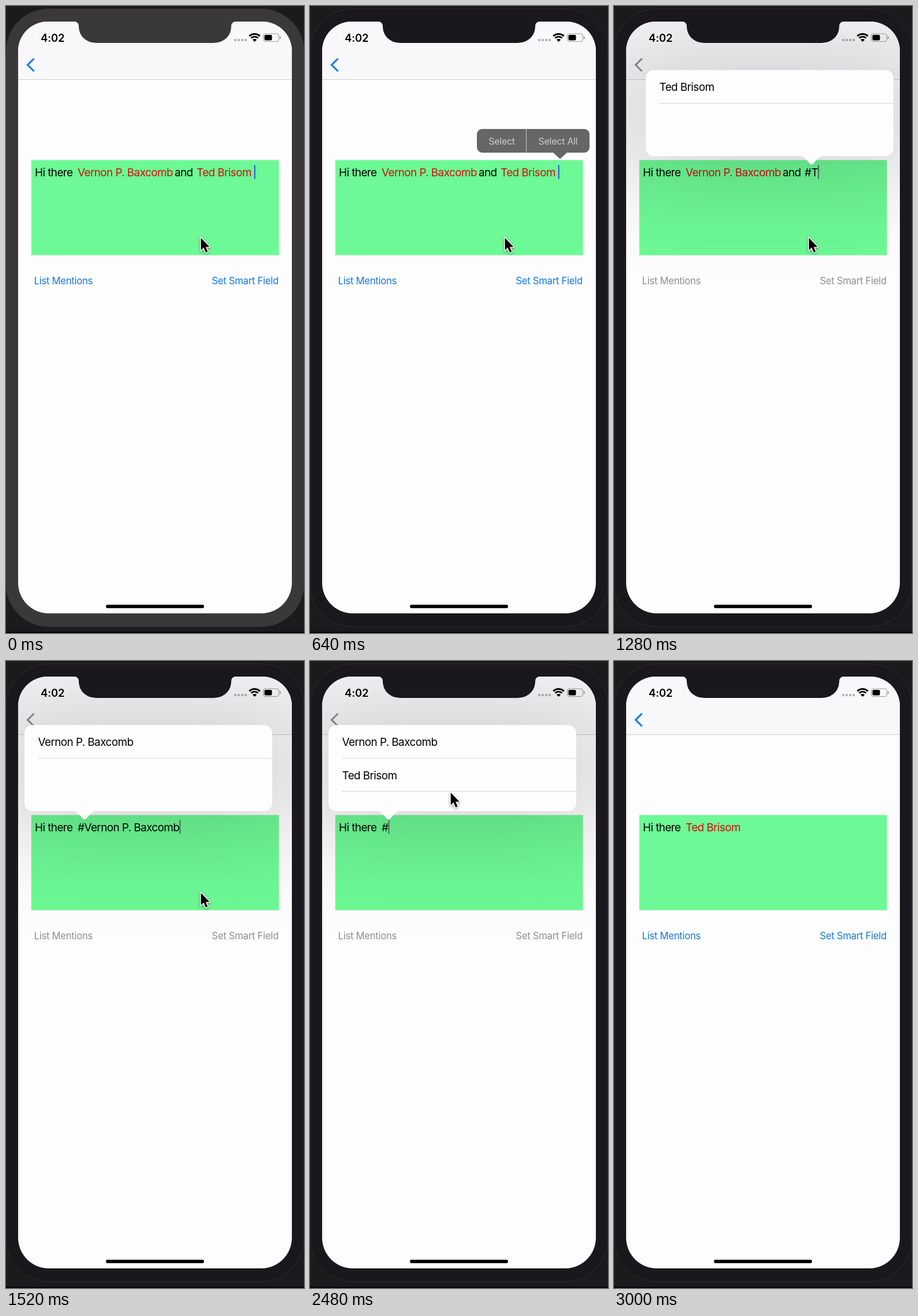
Write an HTML page with a canvas that moves like this. It is 516 px wide and 1086 px high and loops after 3040 ms.

```html
<!DOCTYPE html>
<html lang="en">
<head>
<meta charset="utf-8">
<title>Mention field</title>
<style>
html, body { margin: 0; width: 100%; height: 100%; overflow: hidden; background: #1a191b; }
canvas { display: block; }
</style>
</head>
<body>
<canvas id="stage" width="516" height="1086"></canvas>
<script>
const ctx = document.getElementById('stage').getContext('2d');
const LOOP = 3040;
const FIRST = 'Vernon P. Baxcomb';
const SECOND = 'Ted Brisom';
const RED = '#d60d0d';

// Deleting starts at ERASE and removes one character per KEY milliseconds.
const ERASE = 960, KEY = 33.4, PICK = 2680;
const LINK_END = SECOND.length + 1;
const REOPEN = LINK_END + 5;
const LAST_KEY = REOPEN + FIRST.length;
const keyTime = n => ERASE + n * KEY;

const clamp = v => Math.max(0, Math.min(1, v));
const ramp = (t, a, b) => clamp((t - a) / (b - a));
const smooth = v => v * v * (3 - 2 * v);
const lerp = (a, b, p) => a + (b - a) * p;
const mix = (a, b, p) => `rgb(${a.map((v, i) => Math.round(lerp(v, b[i], p)))})`;

function box(x, y, w, h, r, fill) {
  ctx.beginPath();
  ctx.roundRect(x, y, w, h, r);
  if (fill) { ctx.fillStyle = fill; ctx.fill(); }
}

function polygon(points, fill) {
  ctx.beginPath();
  points.forEach(([x, y]) => ctx.lineTo(x, y));
  ctx.closePath();
  if (fill) { ctx.fillStyle = fill; ctx.fill(); }
}

function setFont(size, spacing, weight = 400) {
  ctx.font = `${weight} ${size}px Inter, sans-serif`;
  ctx.letterSpacing = spacing + 'px';
}
const bodyFont = () => setFont(18.9, -0.58);
const buttonFont = () => setFont(16.7, -0.28);

function label(text, x, y, fill, align = 'left') {
  ctx.textAlign = align;
  ctx.fillStyle = fill;
  ctx.fillText(text, x, y);
}

function drawBezel(t) {
  const dark = ramp(t, 20, 100);
  ctx.fillStyle = '#1b1a1c';
  ctx.fillRect(0, 0, 516, 1086);
  box(0, 5, 516, 1070, 74, mix([58, 56, 59], [26, 24, 28], dark));
  ctx.lineWidth = 1;
  ctx.strokeStyle = mix([54, 53, 55], [46, 44, 48], dark);
  ctx.stroke();
  ctx.fillStyle = '#050505';
  ctx.fillRect(0, 1084, 516, 2);
}

function screenPath() {
  ctx.beginPath();
  ctx.moveTo(71, 27);
  ctx.lineTo(117, 27);
  ctx.quadraticCurveTo(126, 27, 126, 36);
  ctx.bezierCurveTo(126, 52, 139, 64, 156, 64);
  ctx.lineTo(360, 64);
  ctx.bezierCurveTo(377, 64, 390, 52, 390, 36);
  ctx.quadraticCurveTo(390, 27, 399, 27);
  ctx.arcTo(495, 27, 495, 80, 51);
  ctx.arcTo(495, 1052, 440, 1052, 53);
  ctx.arcTo(21, 1052, 21, 1000, 53);
  ctx.arcTo(21, 27, 71, 27, 51);
  ctx.closePath();
}

function drawStatusBar() {
  setFont(18.4, -0.1, 600);
  label('4:02', 60, 61.5, '#000');
  for (let i = 0; i < 4; i++) box(395 + i * 6, 57, 4, 4, 1, '#b5b4b7');

  ctx.strokeStyle = '#000';
  ctx.lineWidth = 2.8;
  for (const r of [13, 8.4]) {
    ctx.beginPath();
    ctx.arc(430.5, 61.5, r, -Math.PI * 0.75, -Math.PI * 0.25);
    ctx.stroke();
  }
  ctx.beginPath();
  ctx.moveTo(430.5, 62);
  ctx.arc(430.5, 62, 5, -Math.PI * 0.75, -Math.PI * 0.25);
  ctx.fillStyle = '#000';
  ctx.fill();

  box(445.5, 48, 27, 13.5, 4);
  ctx.strokeStyle = '#9b9a9d';
  ctx.lineWidth = 1.2;
  ctx.stroke();
  box(447.5, 50, 13, 9.5, 2, '#000');
  box(474, 52.5, 1.8, 4.5, 1, '#9b9a9d');
}

function textRuns(t, n) {
  const hello = ['Hi there ', 50, '#000'];
  if (t >= PICK) return [hello, [SECOND + ' ', 124, RED]];
  if (n >= REOPEN) return [hello, ['#' + FIRST.slice(0, LAST_KEY - n), 124, '#000']];
  const runs = [hello, [FIRST, 124, RED]];
  if (n >= LINK_END) return [...runs, ['and '.slice(0, REOPEN - 1 - n), 292, '#000']];
  runs.push(['and ', 292, '#000']);
  if (t >= ERASE) runs.push(['#' + SECOND.slice(0, SECOND.length - n), 330, '#000']);
  else runs.push([SECOND + (t < 820 ? ' ' : ''), 330, RED]);
  return runs;
}

function caretAlpha(t) {
  if (t >= PICK) return 0;
  if (t < 780) return t % 320 < 200 ? 1 : 0;
  const idle = t - keyTime(LAST_KEY);
  return idle < 0 ? 1 : clamp(0.5 + 1.4 * Math.cos(idle / 360 * Math.PI * 2));
}

function drawField(t, n, dim) {
  box(44, 267, 428.5, 164.5, 0, '#6df995');
  ctx.strokeStyle = '#9cf3b5';
  ctx.lineWidth = 0.7;
  ctx.stroke();
  bodyFont();
  const runs = textRuns(t, n);
  runs.forEach(([text, x, color]) => label(text, x, 295, color));
  const [text, x] = runs[runs.length - 1];
  ctx.globalAlpha = caretAlpha(t);
  ctx.fillStyle = mix([55, 90, 235], [93, 120, 104], dim);
  ctx.fillRect(x + ctx.measureText(text).width, 275.5, 2.2, 24);
  ctx.globalAlpha = 1;
}

function drawPage(t, n, dim) {
  ctx.fillStyle = '#fefdfe';
  ctx.fillRect(21, 27, 474, 1025);
  ctx.fillStyle = '#f8f7fa';
  ctx.fillRect(21, 27, 474, 100);
  ctx.fillStyle = '#cbcace';
  ctx.fillRect(21, 127, 474, 1);
  drawStatusBar();

  ctx.beginPath();
  ctx.moveTo(48.5, 91);
  ctx.lineTo(37.5, 102);
  ctx.lineTo(48.5, 113);
  ctx.strokeStyle = mix([8, 122, 248], [140, 139, 142], dim);
  ctx.lineWidth = 3.1;
  ctx.stroke();

  drawField(t, n, dim);
  buttonFont();
  const tint = mix([16, 118, 226], [142, 141, 144], dim);
  label('List Mentions', 48.5, 482, tint);
  label('Set Smart Field', 472, 482, tint, 'right');
  box(173, 1037, 170, 6, 3, '#000');
}

function drawMenu(alpha) {
  if (!alpha) return;
  ctx.globalAlpha = alpha;
  ctx.beginPath();
  ctx.roundRect(289, 213, 195, 41, 9);
  ctx.moveTo(421, 254);
  ctx.lineTo(433, 265);
  ctx.lineTo(445, 254);
  ctx.fillStyle = '#1e1d1f';
  ctx.fill();
  ctx.fillStyle = '#fff';
  ctx.fillRect(374, 213, 1, 41);
  setFont(16, -0.25);
  label('Select', 332, 239.5, '#fff', 'center');
  label('Select All', 429.5, 239.5, '#fff', 'center');
  ctx.globalAlpha = 1;
}

function drawPopover(x, tip, rows, alpha) {
  ctx.save();
  ctx.globalAlpha = alpha;
  // Only the wide soft shadow lands on the stage here.
  ctx.save();
  ctx.shadowColor = 'rgba(0,0,0,.25)';
  ctx.shadowBlur = 200;
  ctx.shadowOffsetX = 2000;
  ctx.fillStyle = '#000';
  ctx.fillRect(x - 2080, 111, 589, 149);
  ctx.restore();

  box(x, 111, 429, 149, 14, '#fefdfe');
  ctx.beginPath();
  ctx.moveTo(tip - 19, 259.5);
  ctx.quadraticCurveTo(tip - 13, 260, tip - 4, 272);
  ctx.quadraticCurveTo(tip, 277, tip + 4, 272);
  ctx.quadraticCurveTo(tip + 13, 260, tip + 19, 259.5);
  ctx.fill();

  bodyFont();
  rows.forEach((name, i) => {
    const y = 168 + i * 57.5;
    label(name, x + 23.5, y - 21, '#000');
    ctx.fillStyle = '#d5d4d8';
    ctx.fillRect(x + 23, Math.floor(y), 406, 1);
  });
  ctx.restore();
}

function cursorAt(t) {
  const stops = [
    [2280, 337, 401], [2470, 244, 228], [2600, 205, 200],
    [2710, 205, 200], [2860, 420, -40]
  ];
  let [time, x, y] = stops[0];
  for (const [nextTime, nextX, nextY] of stops.slice(1)) {
    const p = smooth(ramp(t, time, nextTime));
    if (p < 1) return [lerp(x, nextX, p), lerp(y, nextY, p)];
    [time, x, y] = [nextTime, nextX, nextY];
  }
  return [x, y];
}

function drawCursor(t) {
  const [x, y] = cursorAt(t);
  ctx.save();
  ctx.translate(x, y);
  polygon([[0.5, 0.5], [0.5, 22], [5.3, 17.6], [9, 26], [12.4, 24.5], [8.8, 16.4], [15.5, 16.2]]);
  ctx.lineJoin = 'round';
  ctx.lineWidth = 3;
  ctx.strokeStyle = '#fff';
  ctx.shadowColor = 'rgba(0,0,0,.4)';
  ctx.shadowBlur = 4;
  ctx.shadowOffsetY = 1.5;
  ctx.stroke();
  ctx.shadowColor = 'transparent';
  ctx.fillStyle = '#000';
  ctx.fill();
  ctx.restore();
}

function draw(t) {
  const n = Math.max(0, Math.min(LAST_KEY, Math.floor((t - ERASE) / KEY)));
  const linkClosed = keyTime(LINK_END), reopened = keyTime(REOPEN);
  const second = ramp(t, ERASE, ERASE + 40) * (1 - ramp(t, linkClosed, linkClosed + 70));
  const first = ramp(t, reopened, reopened + 24) * (1 - ramp(t, PICK + 20, PICK + 180));

  drawBezel(t);
  ctx.save();
  screenPath();
  ctx.clip();
  drawPage(t, n, Math.max(first, second));
  drawMenu(ramp(t, 600, 661) * (1 - ramp(t, 820, 870)));
  if (second) drawPopover(55, 342, n >= SECOND.length ? [FIRST, SECOND] : [SECOND], second);
  if (first) drawPopover(32, 136, n >= LAST_KEY ? [FIRST, SECOND] : [FIRST], first);
  ctx.restore();
  drawCursor(t);
}

const start = performance.now();
function tick() {
  draw((performance.now() - start) % LOOP);
  requestAnimationFrame(tick);
}
tick();
</script>
</body>
</html>
```
